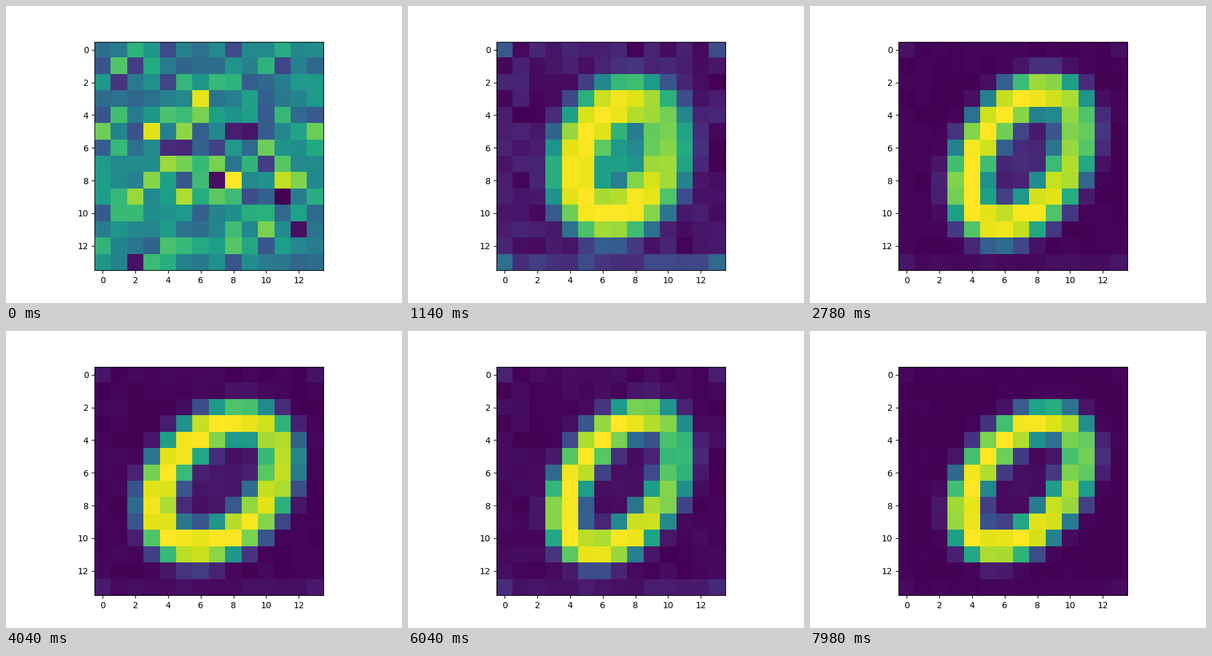
Recreate the animation shown at these times as a matplotlib script. Size 640x480 px, loop 8000 ms.

```python
import numpy as np
import matplotlib.pyplot as plt
from matplotlib.animation import FuncAnimation

N = 14
LOOP, TICK = 8000, 20
CX, CY = 7.1, 6.65

yy, xx = np.mgrid[0:N, 0:N].astype(float)
rng = np.random.default_rng(4)

# Opening noise: calm near the border, stronger towards the middle.
middle = np.exp(-((xx - 6) ** 2 + (yy - 7) ** 2) / 30)
noise = 0.45 + 0.08 * middle + (0.06 + 0.13 * middle) * rng.standard_normal((N, N))
noise = (noise - noise.min()) / np.ptp(noise)

# Faint background: grain, a lighter last row and lighter corners.
haze_map = 0.45 * rng.random((N, N))
haze_map[-1] += 0.5
haze_map[np.ix_([0, -1], [0, -1])] += 0.75

# Poses of the zero: time, half width, half height, slant, stroke width,
# dimming of the upper right, fill of the hole, background haze.
POSES = np.array([
    (1140, 2.6, 3.4, 0.7, 1.85, 0.20, 0.58, 0.25),
    (2780, 3.0, 4.0, 1.4, 1.35, 0.17, 0.13, 0.04),
    (4040, 3.5, 3.8, 1.4, 1.30, 0.10, 0.07, 0.05),
    (5200, 3.3, 3.95, 2.0, 1.25, 0.17, 0.04, 0.15),
    (6980, 2.75, 4.1, 1.1, 1.15, 0.40, 0.05, 0.01),
    (7980, 3.1, 3.8, 1.65, 1.15, 0.18, 0.04, 0.02),
])
angle = np.linspace(0, 2 * np.pi, 160, endpoint=False)


def digit(t):
    """A soft stroke along a slanted ellipse, posed for time t."""
    rx, ry, slant, width, dim, fill, haze = (
        np.interp(t, POSES[:, 0], column) for column in POSES.T[1:])
    px = CX + rx * np.cos(angle) - slant * np.sin(angle)
    py = CY + ry * np.sin(angle)
    strength = 1 - dim * np.maximum(0, np.cos(angle + 0.5)) ** 2
    d = np.hypot(xx[..., None] - px, yy[..., None] - py)
    stroke = (strength * np.exp(-(d / width) ** 3)).max(axis=2)
    hole = fill * np.exp(-((xx - CX) ** 2 + (yy - CY) ** 2) / 6)
    return np.maximum(np.maximum(stroke, hole), haze * haze_map)


def field(t):
    mix = min(1, t / POSES[0, 0])
    z = (1 - mix) * noise + mix * digit(t)
    return (z - z.min()) / np.ptp(z)


def held(t):
    """Steps come in threes: two short ones, then a 100 ms hold."""
    r = (t + 20) % 140
    return t - max(0, r - 40)


fig, ax = plt.subplots(figsize=(6.4, 4.8), dpi=100)
image = ax.imshow(field(0), cmap="viridis", vmin=0, vmax=1)


def update(i):
    image.set_data(field(held(i * TICK)))
    return [image]


anim = FuncAnimation(fig, update, frames=LOOP // TICK, interval=TICK,
                     repeat=True, repeat_delay=0)
plt.show()
```
